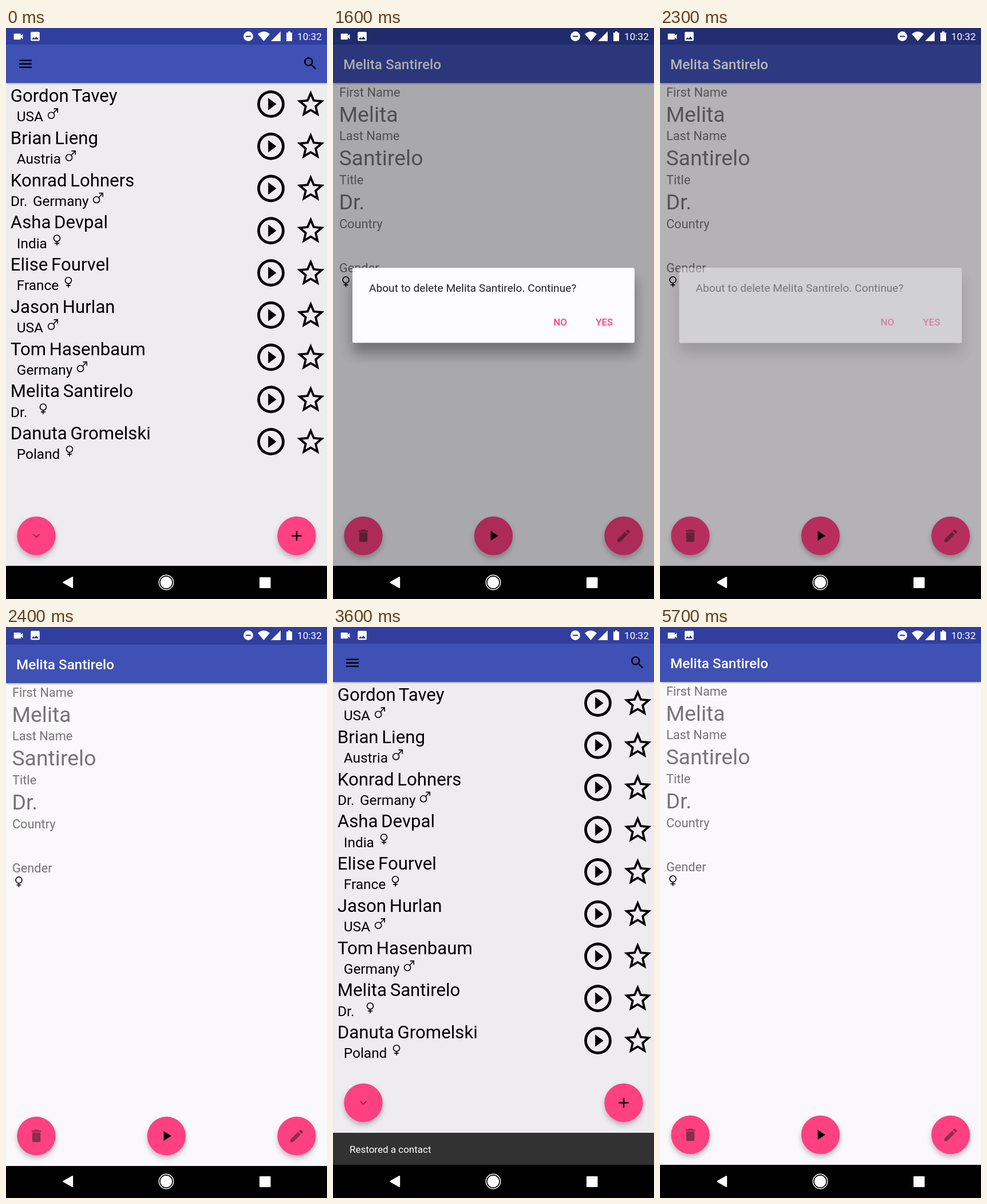
Animation of 561 by 998 pixels, one loop 5900 ms. Source, as an HTML page:

```html
<!DOCTYPE html>
<html lang="en">
<head>
<meta charset="utf-8">
<title>Contacts</title>
<style>
  html, body { margin: 0; width: 100%; height: 100%; overflow: hidden; background: #000; }
  svg { display: block; width: 100%; height: 100%; font-family: Roboto, sans-serif; }
  .bar { filter: drop-shadow(0 1px 1.5px rgba(0, 0, 0, .4)); }
  .fab { filter: drop-shadow(0 5px 4px rgba(0, 0, 0, .25)); }
  .card { filter: drop-shadow(0 18px 12px rgba(0, 0, 0, .35)); }
  .name { word-spacing: -2px; }
  .medium { font-weight: 500; }
  .soft { fill: #222; fill-opacity: .54; }
</style>
</head>
<body>
<svg id="stage" viewBox="0 0 561 998"></svg>
<script>
const W = 561, H = 998, ROW = 73.75, LOOP = 5900, STEP = 100;
const PINK = '#ff4081';
const FIRST = 'Melita', LAST = 'Santirelo', FULL = FIRST + ' ' + LAST;

// Each contact: name, title, country, gender, gender icon x
const contacts = [
  ['Gordon Tavey', '', 'USA', 'm', 82],
  ['Brian Lieng', '', 'Austria', 'm', 113],
  ['Konrad Lohners', 'Dr.', 'Germany', 'm', 161],
  ['Asha Devpal', '', 'India', 'f', 89],
  ['Elise Fourvel', '', 'France', 'f', 109],
  ['Jason Hurlan', '', 'USA', 'm', 82],
  ['Tom Hasenbaum', '', 'Germany', 'm', 133],
  [FULL, 'Dr.', '', 'f', 65],
  ['Danuta Gromelski', '', 'Poland', 'f', 111]
];

// 24-unit icon shapes
const icons = {
  menu: 'M3 18h18v-2H3zM3 13h18v-2H3zM3 6v2h18V6z',
  search: 'M15.5 14h-.8l-.3-.3A6.5 6.5 0 1 0 13.7 14.4l.3.3v.8l5 5 1.5-1.5zM9.5 14a4.5 4.5 0 1 1 0-9 4.5 4.5 0 0 1 0 9z',
  star: 'M22 9.24l-7.19-.62L12 2 9.19 8.63 2 9.24l5.46 4.73L5.82 21 12 17.27 18.18 21l-1.63-7.03zM12 15.4l-3.76 2.27 1-4.28-3.32-2.88 4.38-.38L12 6.1l1.71 4.04 4.38.38-3.32 2.88 1 4.28z',
  circlePlay: 'M10 16.5l6-4.5-6-4.5zM12 2a10 10 0 1 0 0 20 10 10 0 0 0 0-20zM12 20a8 8 0 1 1 0-16 8 8 0 0 1 0 16z',
  more: 'M16.6 8.6L12 13.2 7.4 8.6 6 10l6 6 6-6z',
  add: 'M19 13h-6v6h-2v-6H5v-2h6V5h2v6h6z',
  trash: 'M6 19a2 2 0 0 0 2 2h8a2 2 0 0 0 2-2V7H6zM19 4h-3.5l-1-1h-5l-1 1H5v2h14z',
  play: 'M8 5v14l11-7z',
  edit: 'M3 17.25V21h3.75L17.8 9.94l-3.75-3.75zM20.7 7.04a1 1 0 0 0 0-1.41L18.37 3.3a1 1 0 0 0-1.41 0l-1.83 1.83 3.75 3.75z',
  video: 'M17 10.5V7a1 1 0 0 0-1-1H4a1 1 0 0 0-1 1v10a1 1 0 0 0 1 1h12a1 1 0 0 0 1-1v-3.5l4 4v-11z',
  photo: 'M21 19V5a2 2 0 0 0-2-2H5a2 2 0 0 0-2 2v14a2 2 0 0 0 2 2h14a2 2 0 0 0 2-2zM8.5 13.5l2.5 3 3.5-4.5 4.5 6H5z'
};

const icon = (name, x, y, scale, attrs = '') =>
  `<path d="${icons[name]}" fill-rule="evenodd" transform="translate(${x} ${y}) scale(${scale}) translate(-12 -12)" ${attrs}/>`;
const rect = (x, y, w, h, fill, attrs = '') =>
  `<rect x="${x}" y="${y}" width="${w}" height="${h}" fill="${fill}" ${attrs}/>`;
const text = (x, y, size, str, attrs = '') =>
  `<text x="${x}" y="${y}" font-size="${size}" ${attrs}>${str}</text>`;
const fab = (x, name, scale, attrs) =>
  `<circle class="fab" cx="${x}" cy="887.5" r="33.7" fill="${PINK}"/>` +
  icon(name, x, 887.5, scale, attrs);
const gender = (kind, x, y) =>
  `<path transform="translate(${x} ${y})" fill="none" stroke="#000" stroke-width="1.6" d="` +
  (kind === 'm'
    ? 'M-8.4 3.5a5.5 5.5 0 1 0 11 0a5.5 5.5 0 1 0-11 0M1-.5L8-8M1.5-8.2H8.2V-1.5'
    : 'M-5.5-3a5.5 5.5 0 1 0 11 0a5.5 5.5 0 1 0-11 0M0 2.5V9.5M-4 5.6H4') + '"/>';

const row = ([name, title, country, sex, gx], i) => {
  const y = i * ROW;
  return `<g id="row${i}">` +
    text(7.8, 129 + y, 31.2, name, 'class="name"') +
    text(8.1, 163.3 + y, 24.4, title) +
    text(title ? 47 : 18.8, 163.3 + y, 24.4, country) +
    gender(sex, gx, 149.3 + y) +
    icon('circlePlay', 463, 133 + y, 2.39) +
    icon('star', 532.5, 133 + y, 2.39) + '</g>';
};

const windowBase = bg =>
  rect(0, 0, W, H, bg) +
  rect(0, 29, W, 67, '#3f51b5', 'class="bar"') +
  rect(0, 0, W, 29, '#303f9f');
const navBase = rect(0, 940, W, 140, '#000');

const list = windowBase('#eeecef') +
  icon('menu', 34, 62.7, 1.22) + icon('search', 531.8, 62, 1.2) +
  contacts.map(row).join('') +
  `<g id="fabs">${fab(53, 'more', 1, 'class="soft"')}${fab(508, 'add', 1.22)}</g>` +
  `<g id="snack">${rect(0, 884, W, 56, '#323232')}` +
  text(29, 919, 17, '', 'id="message" fill="#fff"') +
  text(486, 919, 17, 'UNDO', `id="undo" class="medium" fill="${PINK}"`) + '</g>' + navBase;

const fields = [['First Name', FIRST], ['Last Name', LAST], ['Title', 'Dr.'], ['Country', ''], ['Gender', '']];
const detail = windowBase('#faf8fb') +
  text(18, 72, 24.3, FULL, 'class="medium" fill="#fff"') +
  fields.map(([label, value], i) =>
    text(10.9, 119.5 + i * 76.75, 21.8, label, 'fill="#757477"') +
    text(10.4, 163.5 + i * 76.75, 37.4, value, 'fill="#757477"')).join('') +
  gender('f', 22.5, 443.3) +
  fab(53, 'trash', 1.2, 'class="soft"') + fab(280.5, 'play', 1.2) +
  fab(508, 'edit', 1.22, 'class="soft"') + navBase;

const dialog = rect(33.5, 419, 494, 131.5, '#fefdff', 'rx="2.5" class="card"') +
  text(62.5, 460.5, 19.2, `About to delete ${FULL}. Continue?`, 'fill="#212121"') +
  text(385.5, 520, 17, 'NO', `class="medium" fill="${PINK}"`) +
  text(459.5, 520, 17, 'YES', `class="medium" fill="${PINK}"`);

const system = '<g fill="#fff">' +
  icon('video', 21.5, 15, .87) + icon('photo', 51, 14.7, .87) +
  '<circle cx="423.5" cy="14.5" r="8.4"/>' + rect(419, 13.5, 9, 2.2, '#303f9f') +
  '<path d="M450.5 23L440 10.5Q450.5 2 461 10.5zM480 6v17h-17zM490 8h3V6h4v2h3v15h-10z"/>' +
  text(509, 21, 17.2, '10:32') +
  '<path d="M100.5 969l15.5-8.8v17.6z" stroke="#fff" stroke-width="2.4" stroke-linejoin="round"/>' +
  '<circle cx="280" cy="969" r="10.3"/>' +
  '<circle cx="280" cy="969" r="12.7" fill="none" stroke="#fff" stroke-width="1.5"/>' +
  rect(443, 960, 19.5, 19, '#fff', 'rx="1"') + '</g>';

document.getElementById('stage').innerHTML = list +
  `<g id="detail">${detail}</g>` + rect(0, 0, W, H, '#000', 'id="dim"') +
  `<g id="dialog">${dialog}</g>` + system;

const el = id => document.getElementById(id);
const set = (id, name, value) => el(id).setAttribute(name, value);
const part = (t, start, length) => Math.min(1, Math.max(0, (t - start) / length));
const out = (x, power) => 1 - (1 - x) ** power;

function draw(t) {
  // Detail page: slides up while fading in, drops while fading out
  let alpha = 0, y = 0;
  if (t < 2550) {
    alpha = out(part(t, 550, 200), 4) * (1 - part(t, 2400, 150));
    y = 80 * (1 - out(part(t, 550, 350), 5) + part(t, 2300, 250) ** 4);
  } else {
    alpha = out(part(t, 4850, 200), 4);
    y = 80 * (1 - out(part(t, 4850, 350), 5));
  }
  set('detail', 'opacity', alpha);
  set('detail', 'transform', `translate(0 ${y})`);

  // Confirmation dialog
  const scale = .9 + .1 * out(part(t, 1480, 220), 5);
  set('dim', 'opacity', .6 * part(t, 1480, 220) * (1 - part(t, 2210, 170)));
  set('dialog', 'opacity', out(part(t, 1480, 150), 3) * (1 - part(t, 2210, 150)));
  set('dialog', 'transform', `translate(280.5 484.7) scale(${scale}) translate(-280.5 -484.7)`);

  // Snackbars push the round buttons up
  const deleted = t < 3340;
  const lift = 56 * (deleted
    ? out(part(t, 2600, 250), 2) - part(t, 3090, 250) ** 2
    : out(part(t, 3340, 250), 2));
  el('message').textContent = deleted ? 'Deleted a contact' : 'Restored a contact';
  set('undo', 'opacity', deleted ? 1 : 0);
  set('snack', 'transform', `translate(0 ${56 - lift})`);
  set('fabs', 'transform', `translate(0 ${-lift})`);

  const gone = t >= 2300 && t < 3200;
  set('row7', 'opacity', gone ? 0 : 1);
  set('row8', 'transform', `translate(0 ${gone ? -ROW : 0})`);
}

const begin = performance.now();
function tick() {
  const t = (performance.now() - begin) % LOOP;
  draw(Math.floor(t / STEP) * STEP);
  requestAnimationFrame(tick);
}
tick();
</script>
</body>
</html>
```
